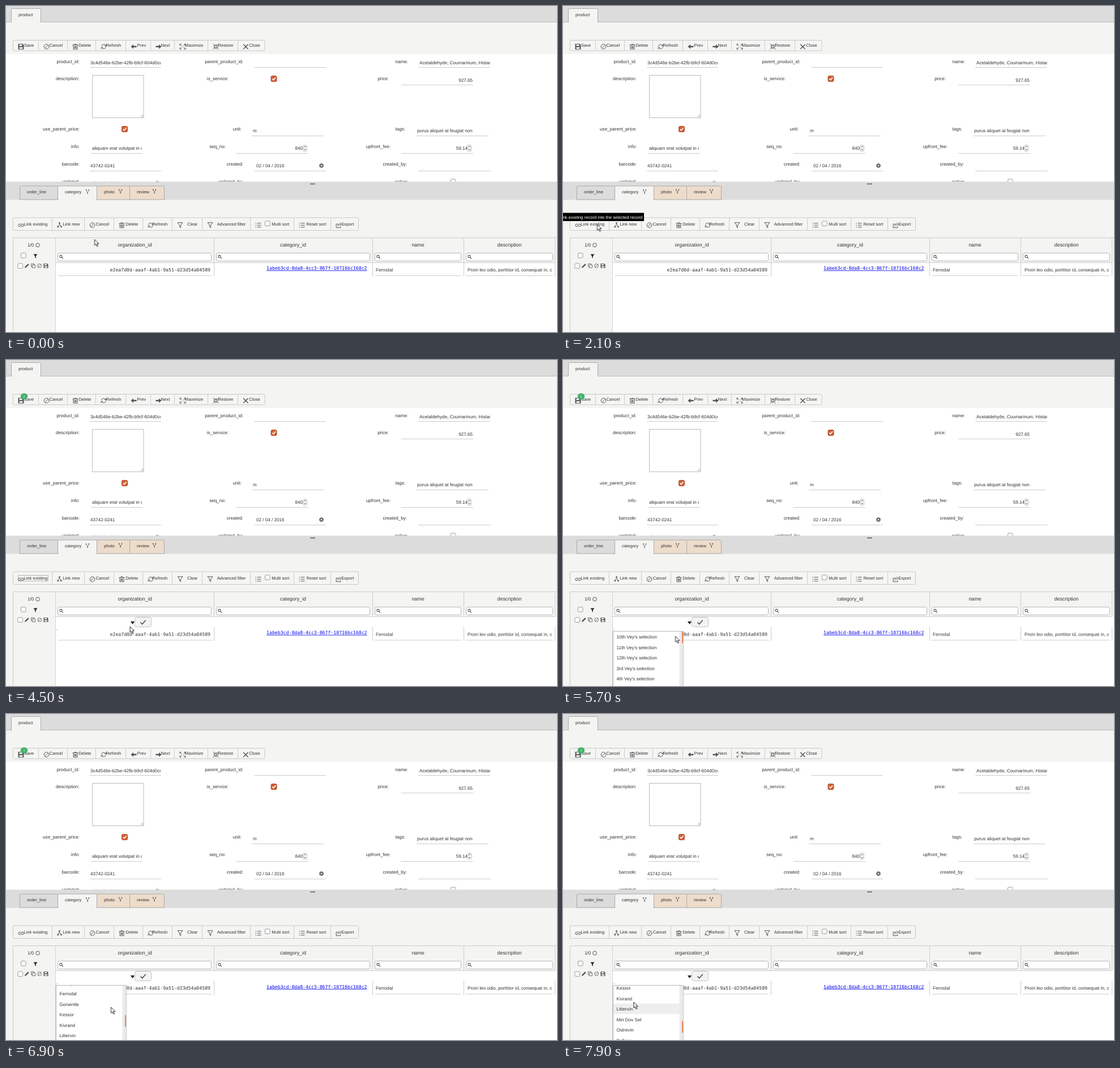
Recreate the animation shown at these times as an HTML page. Size 973 px wide and 576 px high, loop 8 s.

```html
<!DOCTYPE html>
<html lang="en">
<head>
<meta charset="utf-8">
<title>Linking a record</title>
<style>
html, body { margin: 0; width: 100%; height: 100%; overflow: hidden; background: #f4f4f2; }
#stage { display: block; width: 973px; height: 576px; }
text { font: 8.12px "Liberation Sans", Arial, sans-serif; fill: #333; text-rendering: geometricPrecision; white-space: pre; }
.bar { font-size: 7.65px; }
.head { font-size: 8.9px; }
.mono { font-family: "DejaVu Sans Mono", monospace; font-size: 8.2px; }
.link { fill: #00e; text-decoration: underline; }
.tip { font-size: 7.6px; fill: #fff; }
.badge { font-size: 6px; fill: #d8f5e2; }
.icon { fill: none; stroke: #555; stroke-width: 1; }
.solid { fill: #555; }

/* 1% = 80 ms; the small lead keeps changes on the right side of 100 ms marks */
.anim { animation: 8s step-end -5ms infinite; }
.tipNew { animation-name: tipNew; }
.tipOld { animation-name: tipOld; }
.ring { animation-name: ring; }
.shift { animation-name: shift; }
.before { animation-name: before; }
.after { animation-name: after; }
.count { animation-name: count; }
.popup { animation-name: popup, scroll; }
.hover { animation-name: hover; }
.cursor { animation-name: cursor; }
.list { transform: translateY(calc(var(--scroll) * -1px)); }
.thumb { transform: translateY(calc(var(--scroll) * .2212px)); }
@property --scroll { syntax: "<number>"; inherits: true; initial-value: 0; }

@keyframes tipNew { 0% { opacity: 0 } 11.25% { opacity: 1 } 22.5%, 100% { opacity: 0 } }
@keyframes tipOld { 0% { opacity: 0 } 22.5% { opacity: 1 } 46.25%, 100% { opacity: 0 } }
@keyframes ring { 0% { opacity: 0 } 40% { opacity: 1 } 63.75%, 100% { opacity: 0 } }
@keyframes shift { 0% { transform: none } 43.75%, 100% { transform: translateY(18.5px) } }
@keyframes before { 0% { opacity: 1 } 43.75%, 100% { opacity: 0 } }
@keyframes after { 0% { opacity: 0 } 43.75%, 100% { opacity: 1 } }
@keyframes count { 0% { opacity: 0 } 45%, 100% { opacity: 1 } }
@keyframes popup { 0% { opacity: 0 } 66.25%, 100% { opacity: 1 } }
@keyframes hover {
  0% { opacity: 0; transform: translateY(277.5px) }
  90% { opacity: 1; transform: translateY(277.5px) }
  95% { opacity: 1; transform: translateY(296px) }
  98.75%, 100% { opacity: 1; transform: translateY(314.5px) }
}
@keyframes scroll {
  0% { --scroll: 0 }
  73.75% { --scroll: 0; animation-timing-function: steps(3) }
  77.5% { --scroll: 133.5; animation-timing-function: steps(3) }
  81.25% { --scroll: 185 }
  82.5% { --scroll: 185; animation-timing-function: steps(3) }
  86.25% { --scroll: 235.5 }
  87.5% { --scroll: 251 }
  92.5% { --scroll: 251; animation-timing-function: steps(5) }
  98.75%, 100% { --scroll: 282.5 }
}
@keyframes cursor {
  0% { transform: translate(156.5px, 412.5px) }
  6.25% { transform: translate(156.5px, 412.5px); animation-timing-function: steps(6) }
  13.75% { transform: translate(112px, 385px) }
  18.75% { transform: translate(112px, 385px); animation-timing-function: steps(4) }
  23.75% { transform: translate(60px, 385px) }
  26.25% { transform: translate(60.5px, 386px) }
  43.75% { transform: translate(60.5px, 386px); animation-timing-function: steps(8) }
  53.75% { transform: translate(217px, 479px); animation-timing-function: steps(4) }
  58.75% { transform: translate(221px, 463px) }
  66.25% { transform: translate(217px, 464px) }
  71.25% { transform: translate(198.5px, 488px); animation-timing-function: steps(3) }
  75% { transform: translate(185.5px, 518px) }
  88.75% { transform: translate(185.5px, 518px); animation-timing-function: steps(2) }
  91.25%, 100% { transform: translate(125px, 509px) }
}
</style>
</head>
<body>
<svg id="stage" viewBox="0 0 973 576"></svg>
<script>
const text = (x, y, s, cls = '', anchor = 'start') =>
  `<text x="${x}" y="${y + 2.8}" class="${cls}" text-anchor="${anchor}">${s}</text>`;
const rect = (x, y, w, h, fill, stroke = 'none', r = 0) =>
  `<rect x="${x}" y="${y}" width="${w}" height="${h}" rx="${r}" fill="${fill}" stroke="${stroke}"/>`;
const path = (d, attrs = 'class="icon"') => `<path d="${d}" ${attrs}/>`;
const line = (d, color = '#ccc') => path(d, `stroke="${color}" fill="none"`);
const under = (x1, x2, y) => line(`M${x1} ${y + .5}H${x2}`);
const clip = (x, y, w, h, body) => `<svg x="${x}" y="${y}" width="${w}" height="${h}">${body}</svg>`;
const field = (x, right, y, s) => clip(x, y - 8, right - x, 16, text(0, 8, s));
const anim = (name, body) => `<g class="anim ${name}">${body}</g>`;

// Icons live in a 10 x 10 box
const icons = {
  save: path('M0 0H8L10 2V10H0ZM2 1V4H7V1ZM2 6V9H8V6Z', 'class="solid" fill-rule="evenodd"'),
  ban: path('M9.3 5A4.3 4.3 0 1 1 .7 5A4.3 4.3 0 1 1 9.3 5M8 2L2 8'),
  trash: path('M0 2H10M3.5 2V.7H6.5V2M1.5 2V9.5H8.5V2M3.5 4V8M5 4V8M6.5 4V8'),
  refresh: path('M1 4.5A4 4 0 0 1 8.3 3M9.3 .8V3.7H6.3M9 5.5A4 4 0 0 1 1.7 7M.7 9.2V6.3H3.7'),
  prev: path('M0 5L4.5 1V3.8H10V6.2H4.5V9Z', 'class="solid"'),
  next: path('M10 5L5.5 1V3.8H0V6.2H5.5V9Z', 'class="solid"'),
  max: path('M4 4L1 1M.5 3V.5H3M7 4L10 1M8 .5H10.5V3M4 6L1 9M.5 7V9.5H3M7 6L10 9M8 9.5H10.5V7'),
  min: path('M0 0L3.5 3.5M1 4H4V1M10 0L6.5 3.5M9 4H6V1M0 10L3.5 6.5M1 6H4V9M10 10L6.5 6.5M9 6H6V9'),
  close: path('M.7 1L9 9.3M9 1L.7 9.3', 'class="icon" style="stroke-width:1.5"'),
  chain: path('M4.5 3H2.5A2 2 0 0 0 2.5 7.4H4.5M5.5 3H7.5A2 2 0 0 1 7.5 7.4H5.5M3 5.2H7'),
  nodes: path('M1 7.5L4 3.5L7 7.5M4 3.5V1') +
    path('M2.8 0H5.2V2.5H2.8ZM0 6.5H2.4V9H0ZM5.8 6.5H8.2V9H5.8Z', 'class="solid"'),
  funnel: path('M.5 .5H9.5L6 4.8V9.3L4 8V4.8Z'),
  list: path('M3 1.5H10M3 5H10M3 8.5H10M0 1.5H1.4M0 5H1.4M0 8.5H1.4'),
  export: path('M5 3H.6V9.4H8.4V7M3 7Q3.5 3.5 7 3.5M6.5 1L9.5 3.5L6.5 6'),
  pencil: path('M0 10L.8 7L7.5 .3L9.7 2.5L3 9.2Z', 'class="solid"'),
  copy: path('M3 3H9.5V9.5H3ZM3 7H.5V.5H7V3'),
  fork: path('M5 9.5V6L2 3.5V2M5 6L8 3.5V2') +
    '<g class="solid"><circle cx="2" cy="1.3" r="1.2"/><circle cx="8" cy="1.3" r="1.2"/><circle cx="5" cy="9" r="1.2"/></g>',
  search: path('M6.5 3.5A3 3 0 1 1 .5 3.5A3 3 0 1 1 6.5 3.5M5.7 5.7L9.3 9.3', 'class="icon" style="stroke-width:1.5"')
};
const icon = (name, x, y, k = 1) => `<g transform="translate(${x} ${y}) scale(${k})">${icons[name]}</g>`;
const box = (x, y) => rect(x + .5, y + .5, 8.5, 8.5, '#fff', '#999', 1.5);
const checked = (x, y) => rect(x, y, 10, 10, '#cf5f36', '#b5502b', 2) +
  path(`M${x + 2.3} ${y + 5}l2 2.3l3.7-4.6`, 'fill="none" stroke="#fff" stroke-width="1.6"');
const erase = (x, y) => `<circle cx="${x}" cy="${y}" r="3.8" fill="#666"/>` +
  path(`M${x - 1.5} ${y - 1.5}l3 3m0-3l-3 3`, 'stroke="#fff" stroke-width=".9"');
const spinner = (x, y) => rect(x + .5, y + .5, 7, 11.5, '#f2f2f2', '#ccc', 2) +
  path(`M${x + 2.3} ${y + 4.3}l1.7-1.8l1.7 1.8M${x + 2.3} ${y + 8}l1.7 1.8l1.7-1.8`);

function toolbar(y, h, buttons) {
  let left = 12.5;
  const right = buttons[buttons.length - 1][0];
  let out = rect(left, y + .5, right - left, h, '#f5f5f4', '#c8c8c8', 2);
  for (const [end, name, label] of buttons) {
    out += icon(name, left + 9, y + h / 2 - 2.5) + text(end - 8.2, y + h / 2 + .2, label, 'bar', 'end');
    if (end < right) out += line(`M${end} ${y + 1}V${y + h}`);
    left = end;
  }
  return out;
}

function tab(x1, x2, top, bottom, fill, label, tx, fork) {
  const y = (top + bottom) / 2 - 2;
  return path(`M${x1} ${bottom}V${top + 2}q0-2 2-2H${x2 - 2}q2 0 2 2V${bottom}`, `fill="${fill}" stroke="#aaa"`) +
    text(tx, y, label, 'bar') + (fork ? icon('fork', fork - 3.7, y - 4.5, .75) : '');
}

function form() {
  const labels = [
    [129.5, 98, 'product_id'], [419, 98, 'parent_product_id'], [710, 98, 'name'],
    [129.5, 128.5, 'description'], [393, 128.5, 'is_service'], [676, 128.5, 'price'],
    [130, 217.5, 'use_parent_price'], [416, 217.5, 'unit'], [705, 217.5, 'tags'],
    [130, 248.5, 'info'], [388, 248.5, 'seq_no'], [679, 248.5, 'upfront_fee'],
    [130, 279.5, 'barcode'], [419, 279.5, 'created'], [708, 279.5, 'created_by'],
    [130, 310, 'updated'], [419, 310, 'updated_by'], [710, 310, 'active']];
  const lines = [
    [148, 274, 108], [438, 565, 108], [728, 855, 108], [698, 825, 139], [434, 561, 229], [725, 852, 229],
    [150, 241, 260], [407, 534, 260], [698, 825, 260], [148, 274, 291], [439, 565, 291], [728, 856, 291]];
  const body = rect(0, 85, 973, 226, '#fff') +
    labels.map(([x, y, s]) => text(x, y, s + ':', '', 'end')).join('') +
    lines.map(l => under(...l)).join('') +
    field(149, 273, 100.5, '3c4d546e-b2be-42fb-b9cf-604d0ce8a1') +
    field(730, 855, 100.5, 'Acetaldehyde, Coumarinum, Histamine') +
    text(824, 131.5, '927.65', '', 'end') +
    rect(152.5, 122.5, 90.5, 75, '#fff', '#bbb') + line('M238 196l4-4M240.5 196.5l2-2', '#999') +
    checked(468, 123.5) + checked(204.5, 212.5) +
    text(436, 220.5, 'm') + text(726, 220.5, 'purus aliquet at feugiat non') +
    field(152, 240, 251.5, 'aliquam erat volutpat in congue') +
    text(524, 251.5, '840', '', 'end') + spinner(524, 245) +
    text(815, 251.5, '59.14', '', 'end') + spinner(814.5, 245) +
    text(149, 282.5, '43742-0241') + text(442, 282.5, '02 / 04 / 2016') + erase(557, 282) +
    text(152, 313, '07 / 05 / 2016') + erase(267, 313) + box(785, 305.5);
  return clip(0, 0, 973, 310.5, body);
}

function row(seps) {
  return anim('shift',
    line(seps.map(x => `M${x} 453V478`).join('')) +
    under(92, 363, 476) + under(652, 803, 476) + under(812, 965, 476) +
    text(361, 466, 'e2ea7d0d-aaaf-4ab1-9a51-d23d54a04589', 'mono', 'end') +
    text(637.5, 463.5, '1abeb3cd-8da8-4cc3-867f-10716bc168c2', 'mono link', 'end') +
    text(653, 466, 'Ferrodal') +
    field(815, 964, 466, 'Proin leo odio, porttitor id, consequat in, consequat ut'));
}

function table() {
  const seps = [367.5, 647.5, 808.5, 969.5];
  const heads = [[227.5, 'organization_id', 91, 362], [507, 'category_id', 371, 642],
    [727.5, 'name', 651, 803], [889, 'description', 812, 965]];
  return rect(88, 453, 885, 123, '#fff') +
    line('M12.5 576V409.5H973M88 453.5H970') + line(seps.map(x => `M${x} 410V453`).join('')) +
    path('M87.5 410V576', 'stroke="#bbb" stroke-dasharray="2 1.5"') +
    text(38, 422.5, '1/0') + '<circle cx="56" cy="422.5" r="3.4" class="icon"/>' +
    box(26, 436) + path('M48.5 438.5H55.5L52.8 442V445.5L51.2 444.5V442Z', 'fill="#222"') +
    heads.map(([x, s, a, b]) => text(x, 422.5, s, 'head', 'middle') +
      rect(a + .5, 436.5, b - a, 14, '#fff', '#b5b5b5', 3) + icon('search', a + 3.5, 440, .7)).join('') +
    box(20.5, 454.5) + icon('pencil', 33, 455, .8) + icon('copy', 44, 455, .8) +
    icon('ban', 55.2, 455, .8) + icon('save', 66.5, 455, .8) +
    row(seps) +
    anim('after', line('M88 476.5H91.5') + path('M220 462h7l-3.5 5z', 'fill="#111"') +
      rect(227.5, 454.5, 29, 17, '#f3f3f2', '#c4c4c4', 3) +
      path('M237.5 463.5l3.2 3.2l6-7', 'fill="none" stroke="#555" stroke-width="1.7"'));
}

function popup() {
  const items = [10, 11, 12, 3, 4, 5, 6, 7, 8, 9].map(n => `${n}${n === 3 ? 'rd' : 'th'} Vey's selection`)
    .concat('Balvor', 'Corvane', 'Fennip', 'Ferrodal', 'Gorwintle', 'Kessor', 'Kivrand', 'Littervin',
      'Min Dov Sel', 'Ostrevin', 'Pellmar', 'Quenlo', 'Rastiver', 'Solvane');
  const rows = items.map((s, i) => text(6.5, 9.5 + i * 18.5, s)).join('');
  return anim('popup',
    rect(87, 478.5, 127, 100, '#000', 'none', 2).replace('/>', ' opacity=".06"/>') +
    rect(88.5, 479.5, 123.5, 100, '#fff', '#bbb') +
    clip(88, 480, 124, 96,
      `<g class="list">${anim('hover', rect(1, -.3, 117, 18.5, '#eee'))}${rows}</g>` +
      rect(117.5, 0, 6, 96, '#ebebeb') + `<g class="thumb">${rect(122, 0, 2, 20.5, '#ee8355')}</g>`));
}

const tooltip = (name, x, w, s) =>
  anim(name, rect(x, 365.5, w, 14.5, '#000') + text(x + w - 2.8, 372.7, s, 'tip', 'end'));

document.getElementById('stage').innerHTML =
  rect(0, 0, 973, 576, '#f4f4f2') + rect(0, 0, 973, 28, '#dcdcdc') + line('M0 28.5H9.5M61.5 28.5H973', '#bbb') +
  tab(9.5, 61.5, 4.5, 29, '#f4f4f2', 'product', 22, 0) +
  toolbar(60, 18.5, [[57.5, 'save', 'Save'], [108.5, 'ban', 'Cancel'], [158.5, 'trash', 'Delete'],
    [211.5, 'refresh', 'Refresh'], [255.5, 'prev', 'Prev'], [297.5, 'next', 'Next'],
    [356.5, 'max', 'Maximize'], [409.5, 'min', 'Restore'], [457, 'close', 'Close']]) +
  anim('count', '<ellipse cx="32" cy="64.3" rx="6.2" ry="5.6" fill="#45b06c"/>' + text(32, 63.5, '1', 'badge', 'middle')) +
  form() +
  rect(0, 310.5, 973, 32, '#dcdcdc') +
  path('M537.5 314.3h2m1 0h2m1 0h2', 'stroke="#333" stroke-width="1.8"') +
  tab(24.5, 91.5, 318, 342, '#dcdcdc', 'order_line', 37, 0) +
  tab(160.5, 218.5, 318, 342, '#eedccb', 'photo', 173, 202) +
  tab(218.5, 279.5, 318, 342, '#eedccb', 'review', 231, 262) +
  line('M24 342H280', '#aaa') +
  tab(91.5, 160.5, 318, 343, '#f4f4f2', 'category', 104, 144) +
  toolbar(373.5, 22.5, [[81.5, 'chain', 'Link existing'], [138.5, 'nodes', 'Link new'], [190.5, 'ban', 'Cancel'],
    [241.5, 'trash', 'Delete'], [293.5, 'refresh', 'Refresh'], [346.5, 'funnel', 'Clear'],
    [431.5, 'funnel', 'Advanced filter'], [508.5, 'list', 'Multi sort'], [573.5, 'list', 'Reset sort'],
    [622.5, 'export', 'Export']]) +
  box(457, 379.5) +
  anim('ring', path('M21.5 380.5H74.5V390.5H21.5Z', 'fill="none" stroke="#777" stroke-dasharray="1 1"')) +
  table() + popup() +
  tooltip('tipNew', 22, 178, 'Create a new record and link to the selected record') +
  tooltip('tipOld', -48, 191, 'Choose and link existing record into the selected record') +
  anim('cursor', path('M0 0V10.3L2.4 8.2L4.2 12.3L5.9 11.5L4.1 7.5H7.3Z', 'fill="#fff" stroke="#111" stroke-width=".9"'));
</script>
</body>
</html>
```
